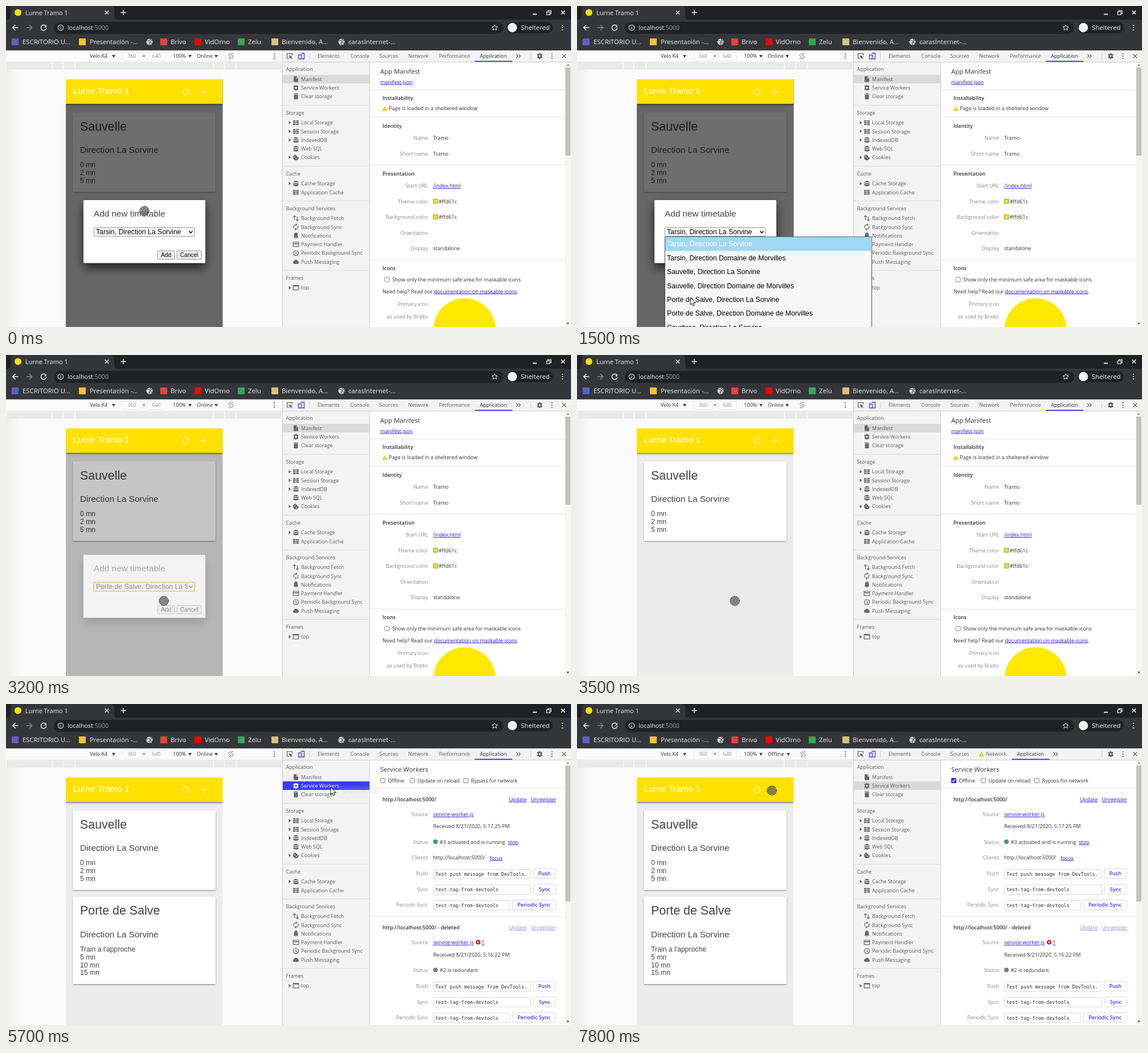
These frames come from a looping animation (992x564 px, 8 s). An HTML page:

```html
<!DOCTYPE html>
<html lang="en">
<head>
<meta charset="utf-8">
<title>Timetable app in a browser</title>
<style>
html, body { margin: 0; width: 100%; height: 100%; overflow: hidden; background: #fff; }
svg { display: block; width: 992px; height: 564px; }
text { font: 9.08px "Open Sans", "Noto Sans", sans-serif; fill: #303030; white-space: pre; }
.ui { font-size: 11.35px; fill: #eceef1; }
.side { font-size: 9px; fill: #5a5a5a; }
.label { fill: #858585; text-anchor: end; }
.title { font-size: 11.35px; }
.bold { font-weight: 600; }
.link { fill: #2a0fdc; text-decoration: underline; }
.faded { fill: #9387d6; }
.btn { fill: #3434df; font-weight: 600; text-anchor: middle; }
.mono { font: 8.36px "DejaVu Sans Mono", monospace; }
.app { font-family: "Liberation Sans", Arial, sans-serif; fill: #424242; }
.s28 { font-size: 21.4px; }
.s20 { font-size: 15.28px; }
.s16 { font-size: 12.22px; }
.s13 { font-size: 10.2px; }
.black { fill: #000; }
.white { fill: #fff; }
.mid { text-anchor: middle; }

[class^="a-"] { animation: 8s step-end infinite; }
.a-cursor { animation-name: cursor; }
.a-touch { animation-name: touch; }
.a-arrow { animation-name: arrow; }
.a-veil { animation-name: veil; }
.a-dialog { animation-name: dialog; }
.a-menu { animation-name: menu; }
.a-first { animation-name: first; }
.a-fifth { animation-name: fifth; }
.a-before { animation-name: before; }
.a-picked { animation-name: picked; }
.a-card { animation-name: card; }
.a-tip1 { animation-name: tip1; }
.a-tip2 { animation-name: tip2; }
.a-manifest { animation-name: manifest; }
.a-workers { animation-name: workers; }
.a-active { animation-name: active; }
.a-online { animation-name: online; }
.a-offline { animation-name: offline; }

@keyframes cursor {
  0% { transform: translate(243px, 360px); animation-timing-function: steps(4); }
  5% { transform: translate(217px, 399.5px); }
  10% { transform: translate(217px, 399.5px); animation-timing-function: steps(7); }
  18.75% { transform: translate(200.5px, 513px); }
  25% { transform: translate(200.5px, 513px); animation-timing-function: steps(2); }
  27.5% { transform: translate(273px, 438px); animation-timing-function: steps(5); }
  33.75% { transform: translate(277px, 432px); }
  53.75% { transform: translate(277px, 432px); animation-timing-function: steps(3); }
  57.5% { transform: translate(524px, 188px); animation-timing-function: steps(2); }
  60% { transform: translate(541.5px, 169px); animation-timing-function: steps(4); }
  65% { transform: translate(577px, 131px); animation-timing-function: steps(3); }
  68.75% { transform: translate(571.5px, 147px); }
  71.25% { transform: translate(571.5px, 147px); animation-timing-function: steps(8); }
  81.25% { transform: translate(691px, 132px); }
  86.25% { transform: translate(691px, 132px); animation-timing-function: steps(4); }
  91.25% { transform: translate(540px, 183px); animation-timing-function: steps(5); }
  97.5%, 100% { transform: translate(342px, 152px); }
}
@keyframes touch { 0%, 22.5%, 93.75%, 100% { opacity: 1; } 11.25%, 57.5% { opacity: 0; } }
@keyframes arrow { 0%, 22.5%, 93.75%, 100% { opacity: 0; } 11.25%, 57.5% { opacity: 1; } }
@keyframes veil {
  0% { opacity: 1; } 38.75% { opacity: .85; } 40% { opacity: .4; }
  41.25% { opacity: .12; } 42.5% { opacity: .03; } 43.75%, 100% { opacity: 0; }
}
@keyframes dialog {
  0%, 38.75% { transform: none; } 40% { transform: translateY(10px); }
  41.25% { transform: translateY(18px); } 42.5%, 100% { transform: translateY(23px); }
}
@keyframes menu { 0%, 22.5%, 100% { opacity: 0; } 7.5% { opacity: 1; } }
@keyframes first { 0% { opacity: 1; } 21.25%, 100% { opacity: 0; } }
@keyframes fifth { 0% { opacity: 0; } 21.25%, 100% { opacity: 1; } }
@keyframes before { 0% { opacity: 1; } 22.5%, 100% { opacity: 0; } }
@keyframes picked { 0% { opacity: 0; } 22.5%, 100% { opacity: 1; } }
@keyframes card { 0% { opacity: 0; } 48.75%, 100% { opacity: 1; } }
@keyframes tip1 { 0%, 61.25%, 100% { opacity: 0; } 58.75% { opacity: 1; } }
@keyframes tip2 { 0%, 72.5%, 100% { opacity: 0; } 67.5% { opacity: 1; } 71.25% { opacity: .12; } }
@keyframes manifest { 0% { opacity: 1; } 71.25%, 100% { opacity: 0; } }
@keyframes workers { 0% { opacity: 0; } 71.25%, 100% { opacity: 1; } }
@keyframes active { 0%, 83.75%, 100% { opacity: 0; } 71.25% { opacity: 1; } }
@keyframes online { 0% { opacity: 1; } 83.75%, 100% { opacity: 0; } }
@keyframes offline { 0% { opacity: 0; } 83.75%, 100% { opacity: 1; } }
</style>
</head>
<body>
<svg id="stage" viewBox="0 0 992 564"></svg>
<script>
const YELLOW = '#ffe100', DARK = '#202124', BAR = '#35363a', BLUE = '#3b3bed', PALE = '#fff3a0';
const STOP = 'La Sorvine', END = 'Domaine de Morvilles', HALL = 'Porte de Salve';

const rect = (x, y, w, h, fill, more = '') =>
  `<rect x="${x}" y="${y}" width="${w}" height="${h}" fill="${fill}" ${more}/>`;
const dot = (x, y, r, fill, more = '') => `<circle cx="${x}" cy="${y}" r="${r}" fill="${fill}" ${more}/>`;
const shape = (d, fill, x = 0, y = 0) => `<path d="${d}" fill="${fill}" transform="translate(${x} ${y})"/>`;
const line = (d, color, x = 0, y = 0, w = 1.2) =>
  `<path d="${d}" fill="none" stroke="${color}" stroke-width="${w}" transform="translate(${x} ${y})"/>`;
const base = (x, y, s, cls = '') => `<text x="${x}" y="${y}" class="${cls}">${s}</text>`;
// y is the middle of the line of text
const text = (x, y, s, cls = '') => base(x, y + (/ui|title/.test(cls) ? 4.1 : 3.3), s, cls);
const group = (cls, ...parts) => `<g class="${cls}">${parts.join('')}</g>`;
const framed = (x, y, w, h, fill, border, r = 1) =>
  rect(x + .5, y + .5, w - 1, h - 1, fill, `stroke="${border}" stroke-width=".8" rx="${r}"`);
const dots = (x, y, c) => [-4, 0, 4].map(d => dot(x, y + d, 1.1, c)).join('');
const cross = (x, y, r, c) => line(`M${-r} ${-r}L${r} ${r}M${r} ${-r}L${-r} ${r}`, c, x, y, 1.3);
const plus = (x, y, r, c, w = 1.4) => line(`M${-r} 0H${r}M0 ${-r}V${r}`, c, x, y, w);
const caret = (x, y, c = '#444') => shape('M-3 -2H3L0 3z', c, x, y);
const reload = (x, y, r, c, w = 1.4) =>
  line(`M${r * .75} ${-r * .66}A${r} ${r} 0 1 0 ${r} 1`, c, x, y, w) +
  shape(`M${r} ${-r}V-.6H1z`, c, x, y);
const warn = (x, y) => shape('M0 -4L4.5 4H-4.5z', '#f4bd00', x, y) + line('M0 -1.6V1.3M0 2V3', '#fff', x, y, 1);
const globe = x => dot(x, 63, 5.5, '#e8eaed') +
  line('M-5 -2H0L2 0L-1 2L0 5M1 -5L3 -2H5M2 2H5', BAR, x, 63, 1.2);
const rule = y => rect(639, y, 342, 1, '#e2e2e2');

function browser() {
  const marks = [[29, 'ESCRITORIO U...'], [147, 'Presentación -...'], [289, 'Brivo'], [349, 'VidOrno'],
    [425, 'Zelu'], [484, 'Bienvenido, A...'], [601, 'carasInternet-...']];
  const badges = [[10, '#5c62c6'], [128, '#fbc02d'], [271, '#e5443a'], [331, '#f00'], [407, '#35a853'], [466, '#d8c27a']];
  return rect(0, 0, 992, 78, BAR) + rect(0, 0, 992, 24, DARK) +
    shape('M2 24Q8 24 8 18V6Q8 0 14 0H184Q190 0 190 6V18Q190 24 196 24z', BAR) +
    dot(21, 11.5, 6, '#ffe000') + text(34, 11.5, 'Lurne Tramo 1', 'ui" style="font-size:11px') +
    cross(177, 11.5, 3.2, '#e8eaed') + plus(206, 11.5, 4.6, '#e8eaed') +
    line('M925 14.5H932', '#fff', 0, 0, 1.8) + line('M949.5 10H955V15.5H949.5zM951.5 10V8H957V13.5H955', '#fff', 0, 0, 1.2) +
    cross(978, 11.5, 3.2, '#fff') +
    line('M5 0H-4.5M0 -4.8L-4.8 0L0 4.8', '#f1f3f4', 16.5, 38, 1.5) +
    line('M-5 0H4.5M0 -4.8L4.8 0L0 4.8', '#85878a', 41, 38, 1.5) + reload(66, 38, 4.8, '#f1f3f4') +
    rect(84, 28, 789, 21, DARK, 'rx="10.5"') +
    dot(96, 38, 4.8, 'none', 'stroke="#e8eaed" stroke-width="1.1"') + line('M0 -2.8V-1.5M0 -.5V3', '#e8eaed', 96, 38) +
    text(108, 38, 'localhost<tspan fill="#9aa0a6">:5000</tspan>', 'ui" style="font-size:10.7px') +
    line('M0 -5L1.5 -1.6L5 -1.3L2.3 1L3.2 4.5L0 2.6L-3.2 4.5L-2.3 1L-5 -1.3L-1.5 -1.6z', '#e8eaed', 858, 38, 1) +
    rect(879, 28, 81, 20, DARK, 'rx="10"') + dot(889, 38, 8.2, '#f4f5f6') + text(904, 38, 'Sheltered', 'ui') +
    dots(977, 38, '#e8eaed') +
    badges.map(([x, c]) => rect(x, 57, 12, 12, c, 'rx="1"')).join('') + globe(252) + globe(589) +
    marks.map(([x, s]) => text(x, 63, s, 'ui')).join('');
}

function card(y, place, lines) {
  return rect(117.5, y, 250.5, lines.length * 13.8 + 98, '#fff', 'rx="1.5" filter="url(#low)"') +
    base(130, y + 31.5, place, 'app s28') + base(130, y + 71.3, 'Direction ' + STOP, 'app s20') +
    lines.map((s, i) => base(130, y + 96.3 + i * 13.75, s, 'app s16')).join('');
}

function button(x, w, s) {
  return framed(x, 429.5, w, 16, '#efefef', '#767676', 1.5) + base(x + w / 2, 441.2, s, 'app s13 black mid');
}

function device() {
  const dialog = group('a-dialog',
    rect(136, 341, 214, 110.5, '#fff', 'rx="1.5" filter="url(#high)"'),
    base(154, 369.8, 'Add new timetable', 'app s20'),
    framed(154, 389, 177.5, 16, '#fff', '#767676', 1),
    group('a-before', base(158, 401.2, `Tarsin, Direction ${STOP}`, 'app s16 black')),
    group('a-picked', rect(154, 389.3, 177.5, 15.5, 'none', 'rx="2" stroke="#e59a0c" stroke-width="1.8"'),
      `<g clip-path="url(#field)">${base(158, 401.2, `${HALL}, Direction ${STOP}`, 'app s16 black')}</g>`),
    line('M-3 -1.5L0 1.7L3 -1.5', '#000', 324.5, 397, 1.6),
    button(265.5, 31, 'Add'), button(299.5, 44, 'Cancel'));
  const mode = (s, x) => text(335, 88, s) + caret(x, 88) +
    line('M-1.5 -4.5L4.5 1.5L1.5 4.5L-4.5 -1.5zM1 -5L4 -4M-1 5L-4 4', '#5c5c5c', x + 26, 88, 1);
  return rect(0, 78, 485, 486, '#fbfbfb') + rect(0, 112, 24, 452, 'url(#edge)') + rect(0, 98, 485, .8, '#dcdcdc') +
    text(147, 88, 'Velo K4') + caret(189, 88) +
    framed(205, 81, 33, 15, '#fff', '#e2e2e2') + text(221, 88, '360', 'mid" style="fill:#888') + text(242, 88, '×', 'mid') +
    framed(248, 81, 32, 15, '#fff', '#e2e2e2') + text(264, 88, '640', 'mid" style="fill:#888') +
    text(293, 88, '100%') + caret(323, 88) +
    group('a-online', mode('Online', 369)) + group('a-offline', mode('Offline', 371)) + dots(471, 88, '#555') +
    rect(1, 99.5, 483, 12.5, '#e9e9e9') +
    [81, 100, 121, 364, 384, 404].map(x => rect(x - .5, 99.5, 1.2, 12.5, '#fff')).join('') +
    `<g clip-path="url(#screen)">` + rect(105, 129, 275.5, 435, '#ececec') +
    card(187, 'Sauvelle', ['0 mn', '2 mn', '5 mn']) +
    group('a-card', card(338.8, HALL, ["Train a l'approche", '5 mn', '10 mn', '15 mn'])) +
    group('a-veil', rect(105, 129, 275.5, 435, '#000', 'opacity=".57"'), dialog) +
    rect(105, 129, 275.5, 42.8, YELLOW, 'filter="url(#head)"') + '</g>' +
    base(117.5, 154.3, 'Lurne Tramo 1', 'app s20 white') +
    reload(316, 150.5, 5.4, PALE, 1.2) + plus(347, 150.5, 5.2, PALE, 1.3);
}

// icons are drawn around 0,0
const ICONS = {
  file: 'M-4 -5H1L4 -2V5H-4zM1 -4V-1H4z',
  gear: 'M-1 -5H1L1.5 -3.4L3.5 -4L4.6 -2.2L3.5 -1V1L4.6 2.2L3.5 4L1.5 3.4L1 5H-1L-1.5 3.4L-3.5 4L-4.6 2.2L-3.5 1V-1L-4.6 -2.2L-3.5 -4L-1.5 -3.4zM0 -1.7A1.7 1.7 0 1 0 .1 -1.7z',
  trash: 'M-4 -5H-1.5V-5.5H1.5V-5H4V-3.7H-4zM-3.5 -3H3.5V5H-3.5z',
  grid: 'M-5 -4H-.5V-1.7H-5zM.5 -4H5V-1.7H.5zM-5 -1H-.5V1.3H-5zM.5 -1H5V1.3H.5zM-5 2H-.5V4.3H-5zM.5 2H5V4.3H.5z',
  base: 'M-4.5 -3.5Q0 -6.5 4.5 -3.5Q0 -.8 -4.5 -3.5zM-4.5 -2.2Q0 .3 4.5 -2.2V-.5Q0 2 -4.5 -.5zM-4.5 .7Q0 3 4.5 .7V3.5Q0 6.2 -4.5 3.5z',
  cookie: 'M0 -5A5 5 0 1 0 5 0L2.5 -.5L2 -3L0 -3zM-2.5 -1.5H-1V0H-2.5zM0 1H1.5V2.5H0z',
  bell: 'M0 -5.5Q3.3 -5 3.3 -1V2L4.5 3.5H-4.5L-3.3 2V-1Q-3.3 -5 0 -5.5zM-1.2 4.2H1.2V5.3H-1.2z',
  cloud: 'M-3 3.7A2.7 2.7 0 0 1 -3.2 -1.5A3.5 3.5 0 0 1 3.3 -1.3A2.6 2.6 0 0 1 3.2 3.7z'
};
const STROKES = {
  updown: 'M-2.5 3V-4.5M-5 -2L-2.5 -4.5L0 -2M2.5 -3V4.5M0 2L2.5 4.5L5 2',
  sync: 'M-3 2.5A4 4 0 0 1 0 -4L1.5 -4M0 -5.5L1.7 -4L0 -2.4M3 -2.5A4 4 0 0 1 0 4H-1.5M0 2.4L-1.7 4L0 5.5',
  pay: 'M-4.8 -3.8H4.8V3.8H-4.8zM-4.8 -1.5H4.8M-4.8 -.8H4.8',
  clock: 'M0 -4.6A4.6 4.6 0 1 0 .1 -4.6M0 -2.8V.3L2.3 1.6',
  frame: 'M-4.8 -4H4.8V4H-4.8zM-4.8 -2.8H4.8'
};
const icon = (name, x, y, c) => ICONS[name]
  ? `<g fill-rule="evenodd">${shape(ICONS[name], c, x, y)}</g>` : line(STROKES[name], c, x, y);
const item = (y, name, s, c = '#666') =>
  icon(name, 509, y, c) + text(518, y, s, c === '#fff' ? 'side white' : 'side');

function sidebar() {
  const sections = [
    [111, 'Application', [['file', 'Manifest'], ['gear', 'Service Workers'], ['trash', 'Clear storage']]],
    [187.5, 'Storage', [['grid', '+Local Storage'], ['grid', '+Session Storage'], ['base', '+IndexedDB'], ['base', 'Web SQL'], ['cookie', '+Cookies']]],
    [294.5, 'Cache', [['base', '+Cache Storage'], ['grid', 'Application Cache']]],
    [355.5, 'Background Services', [['updown', 'Background Fetch'], ['sync', 'Background Sync'], ['bell', 'Notifications'],
      ['pay', 'Payment Handler'], ['clock', 'Periodic Background Sync'], ['cloud', 'Push Messaging']]],
    [477.5, 'Frames', [['frame', '+top']]]
  ];
  let out = rect(486, 98, 152, 466, '#f3f3f3') + rect(638, 98, 1, 466, '#cdcdcd') +
    group('a-manifest', rect(486, 121, 152, 15, '#dadada')) + group('a-workers', rect(486, 136, 152, 15, '#dadada'));
  for (const [y, head, rows] of sections) {
    if (y > 111) out += rect(486, y - 13.5, 152, 1, '#dcdcdc');
    out += text(491.5, y, head, 'side');
    rows.forEach(([name, s], i) => {
      const at = y + 17.4 + i * 15.3;
      if (s[0] === '+') out += shape('M-1.5 -3L2.5 0L-1.5 3z', '#666', 498, at);
      out += item(at, name, s.replace('+', ''));
    });
  }
  return out + group('a-active', rect(486, 136, 152, 15, BLUE), item(143.7, 'gear', 'Service Workers', '#fff'));
}

function toolbar() {
  const tab = (x, s) => text(x, 88, s, 'side');
  const current = x => text(x, 88, 'Application') + rect(x - 9, 96.3, 66, 1.8, BLUE) +
    line('M-3 -3L0 0L-3 3M1 -3L4 0L1 3', '#555', x + 67, 88, 1.1);
  return rect(485, 78, 507, 20, '#f3f3f3') + rect(485, 98, 507, 1, '#cdcdcd') + rect(485, 78, 1, 486, '#c8c8c8') +
    line('M-1 4H-4.5V-4.5H4.5V-1', '#5a5a5a', 498, 88) + shape('M-1.5 -1.5L5 1.2L2.6 2.3L4.8 4.6L4 5.4L1.9 3L1 5z', '#5a5a5a', 498, 88) +
    line('M-1 -5H5V5H1M-5 -2H0V5H-5z', BLUE, 518.5, 88, 1.3) + rect(532, 82, 1, 12, '#ccc') +
    tab(547, 'Elements') + tab(604.5, 'Console') + tab(655.5, 'Sources') +
    group('a-online', tab(706, 'Network'), tab(760, 'Performance'), current(832)) +
    group('a-offline', warn(710, 88), tab(718, 'Network'), current(772.5)) +
    rect(921, 82, 1, 12, '#ccc') + icon('gear', 937, 88, '#5a5a5a') + dots(958.5, 88, '#5a5a5a') + cross(980, 88, 3.4, '#5a5a5a');
}

const scroll = end => rect(981, 99, 11, 465, '#f6f6f6') + rect(982, 108, 9, end - 108, '#c2c2c2') +
  shape('M-2.5 1.5H2.5L0 -1.7z', '#888', 986.5, 103.5) + shape('M-2.5 -1.5H2.5L0 1.7z', '#444', 986.5, 558);
const check = (x, y) => framed(x, y - 4.5, 9, 9, '#fff', '#666', 1.5);
const field = (y, name, value = '', cls = '') => text(741, y, name, 'label') + text(750, y, value, cls);

function manifest() {
  const color = (y, name) => field(y, name) + framed(750, y - 4.5, 8.5, 8.5, YELLOW, '#777', 0) + text(759.5, y, '#ffd61c');
  return rect(639, 99, 353, 465, '#fff') + text(657, 114.5, 'App Manifest', 'title') + text(657, 133.3, 'manifest.json', 'link') +
    [147, 195, 279, 446].map(rule).join('') +
    text(661, 162, 'Installability', 'bold') + warn(665, 180) + text(672, 180, 'Page is loaded in a sheltered window') +
    text(661, 210.5, 'Identity', 'bold') + field(232, 'Name', 'Tramo') + field(259.3, 'Short name', 'Tramo') +
    text(661, 294.3, 'Presentation', 'bold') + field(315.7, 'Start URL', '/index.html', 'link') +
    color(343.3, 'Theme color') + color(370.8, 'Background color') + field(398.3, 'Orientation') + field(425.7, 'Display', 'standalone') +
    text(661, 461, 'Icons', 'bold') + check(664.5, 480.5) + text(678, 480.5, 'Show only the minimum safe area for maskable icons') +
    text(661, 501.2, 'Need help? Read our <tspan class="link">documentation on maskable icons</tspan>.') +
    field(524, 'Primary icon') + field(545.7, 'as used by Bralto') + dot(805, 568, 54.5, '#ffe800') + scroll(263);
}

function entry(y, tail, link, source, received, status, tint, gap) {
  const row = (dy, name, s, act, inputW, x) => {
    const at = y + dy + gap;
    return text(741, at, name, 'label') + framed(750, at - 8, inputW, 17.5, '#fff', '#ccc', 1) +
      base(754, at + 3.9, s, 'mono') + framed(x, at - 9, 965.5 - x, 18, '#fff', '#c9c9d6', 2.5) + text((x + 965.5) / 2, at, act, 'btn');
  };
  return text(661, y, 'http://localhost:5000/' + tail, 'bold') + text(883, y, 'Update', link) + text(921.5, y, 'Unregister', link) +
    field(y + 26.3, 'Source', 'service-worker.js', 'link') + source + text(750, y + 47.5, received) +
    field(y + 75, 'Status') + dot(754, y + 74.5, 3.7, tint, 'stroke="#555" stroke-width=".6"') + text(761.5, y + 75, status) +
    row(130.5, 'Push', 'Test push message from DevTools.', 'Push', 170.5, 925) +
    row(158, 'Sync', 'test-tag-from-devtools', 'Sync', 172, 926) +
    row(185.5, 'Periodic Sync', 'test-tag-from-devtools', 'Periodic Sync', 134.5, 888.5);
}

function workers() {
  const failure = dot(829, 418.5, 4, '#dc0f0f') + cross(829, 418.5, 1.3, '#fff') + text(835, 418.8, '1', 'link');
  return rect(639, 99, 353, 465, '#fff') + text(657, 114.5, 'Service Workers', 'title') +
    [[657, 'Offline'], [709, 'Update on reload'], [803, 'Bypass for network']]
      .map(([x, s]) => check(x, 134.5) + text(x + 13.5, 134.5, s)).join('') +
    group('a-offline', rect(657, 130, 9, 9, '#2929dc', 'rx="1.5"'), line('M-2.6 0L-.7 2L2.7 -2.2', '#fff', 661.5, 134.5, 1.4)) +
    rule(147) + rule(372.5) +
    entry(167.5, '', 'link', '', 'Received 8/21/2020, 5:17:25 PM', '#3 activated and is running', '#2bb24c', 0) +
    text(881, 242.5, 'stop', 'link') + field(270, 'Clients', 'http://localhost:5000/') + text(849, 270.3, 'focus', 'link') +
    entry(392.7, ' - deleted', 'link faded', failure, 'Received 8/21/2020, 5:16:22 PM', '#2 is redundant', '#808080', -27.5) +
    scroll(347);
}

function menu() {
  const names = [`Tarsin, Direction ${STOP}`, `Tarsin, Direction ${END}`, `Sauvelle, Direction ${STOP}`, `Sauvelle, Direction ${END}`,
    `${HALL}, Direction ${STOP}`, `${HALL}, Direction ${END}`, `Courbrac, Direction ${STOP}`];
  const option = (i, cls) => base(158, 422.3 + i * 24.4, names[i], 'app s16 ' + cls);
  const chosen = (cls, i) => group(cls, rect(155, 406 + i * 24.4, 361.5, 24.4, '#9fd8f3'), option(i, 'white'));
  return group('a-menu', rect(154.5, 405.5, 362.5, 170, '#f7f7f7', 'stroke="#5f5f5f" stroke-width=".9" filter="url(#low)"'),
    names.map((_, i) => option(i, 'black')).join(''), chosen('a-first', 0), chosen('a-fifth', 4));
}

const tip = (cls, x, y, w, h, s) => group(cls,
  rect(x, y, w, h, '#f7f7f7', 'rx="1.5" stroke="#c4c4c4" stroke-width=".8" filter="url(#low)"'), text(x + w / 2, y + h / 2, s, 'mid'));

const pointer = group('a-cursor',
  group('a-touch', dot(0, 0, 8.3, '#555', 'fill-opacity=".7" stroke="#2c2c2c" stroke-width="1" stroke-dasharray="2.2 1.6"')),
  group('a-arrow', '<path d="M-1.5 -1V12L1.5 9.3L3.5 14L5.7 13L3.7 8.6H7.8z" fill="#fff" stroke="#111" stroke-width="1"/>'));

const shadow = (id, dy, blur, alpha) => `<filter id="${id}" x="-30%" y="-30%" width="160%" height="180%">
  <feDropShadow dx="0" dy="${dy}" stdDeviation="${blur}" flood-opacity="${alpha}"/></filter>`;

document.getElementById('stage').innerHTML = `<defs>
  ${shadow('low', 1.2, 1.3, .45)}${shadow('head', 1.8, 1.8, .5)}${shadow('high', 9, 8.5, .68)}
  <linearGradient id="edge"><stop stop-color="#000" stop-opacity=".05"/><stop offset="1" stop-color="#000" stop-opacity="0"/></linearGradient>
  <clipPath id="field"><rect x="155" y="388" width="164.5" height="18"/></clipPath>
  <clipPath id="screen"><rect x="105" y="128" width="275.5" height="436"/></clipPath></defs>` +
  browser() + device() + sidebar() + group('a-manifest', manifest()) + group('a-workers', workers()) + toolbar() +
  menu() + tip('a-tip1', 534.5, 204.5, 45.5, 18.5, 'Storage') + tip('a-tip2', 584, 145, 80, 18, 'Service Workers') + pointer;
</script>
</body>
</html>
```
